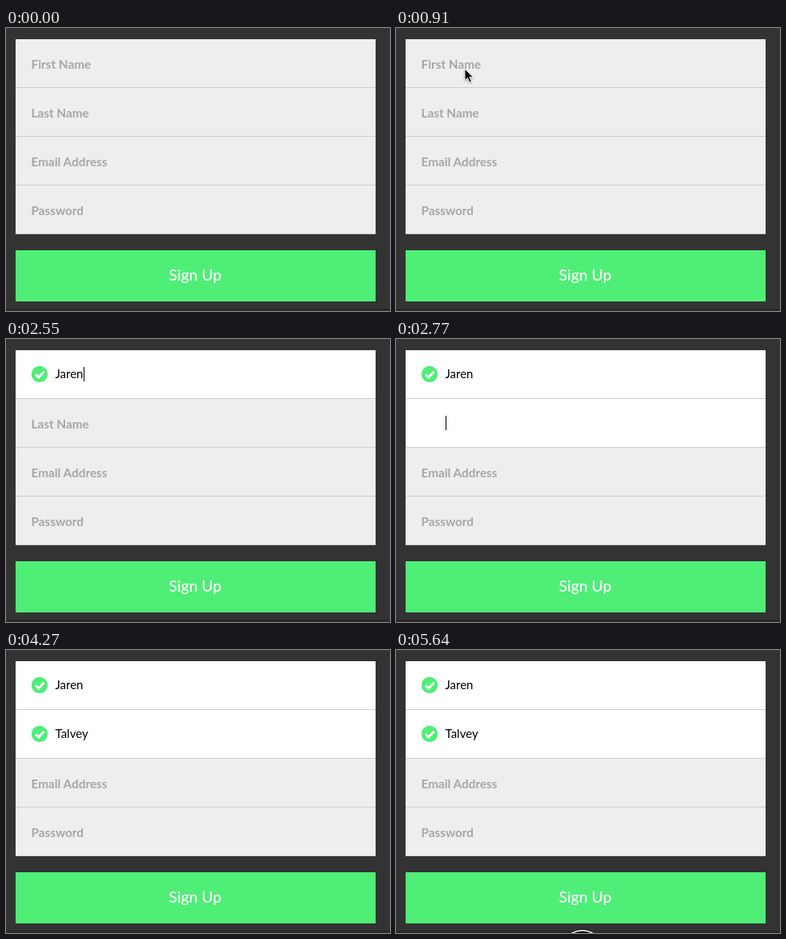
These frames come from a looping animation (480 px wide and 354 px high, 5.69 s). An HTML page:

```html
<!DOCTYPE html>
<html lang="en">
<meta charset="utf-8">
<title>Sign up form</title>
<style>
  html, body { margin: 0; width: 100%; height: 100%; overflow: hidden; background: #333; }
  svg { display: block; width: 480px; height: 354px; font-family: Lato, "Open Sans", sans-serif; }
  .label { font-size: 15.3px; font-weight: 700; fill: #a6a6a6; }
  .value { font-size: 15px; fill: #000; }
  .button { font-size: 19.4px; font-weight: 500; fill: #fff; text-anchor: middle; }
</style>
<svg viewBox="0 0 480 354">
  <g id="fields"></g>
  <rect x="12" y="278" width="450" height="64" fill="#4fee77"/>
  <text class="button" x="236.5" y="316">Sign Up</text>
  <path d="M0 352.500H480" stroke="#2b292a" stroke-width="3"/>
  <g id="ring">
    <circle cx="233" cy="378" r="29" fill="#222"/>
    <circle cx="233" cy="378" r="27" fill="#000" stroke="#fff" stroke-width="1.600"/>
  </g>
  <g id="pointer">
    <path d="M0 0V14.500L3.400 11.400L5.800 17L8.400 15.900L6 10.500H10.500Z"
      fill="#000" stroke="#fff" stroke-width="1" style="filter:drop-shadow(0 1px 1px #0006)"/>
  </g>
</svg>
<script>
const LOOP = 5690;
const $ = id => document.getElementById(id);

// focus and blur times, then the typing interval
const fields = [
  { label: 'First Name', value: 'Jaren', focus: 1230, blur: 2700, from: 1850, to: 2330 },
  { label: 'Last Name', value: 'Talvey', focus: 2700, blur: 3900, from: 3010, to: 3400 },
  { label: 'Email Address' },
  { label: 'Password' }
];

$('fields').innerHTML = fields.map((f, i) => `
  <g transform="translate(12 ${14 + 61 * i})">
    <rect class="back" width="450" height="61"/>
    <path d="M0 60.500H450" stroke="#ccc"/>
    <text class="label" x="19.500" y="37">${f.label}</text>
    <g class="check">
      <circle cx="30" cy="30" r="10.200" fill="#4fee77"/>
      <path d="M25 30.200L28.800 34L35.500 26.700" fill="none" stroke="#fff" stroke-width="3"/>
    </g>
    <text class="value" x="49.500" y="35"></text>
    <rect class="caret" y="21" width="1" height="18"/>
  </g>`).join('');

fields.forEach((f, i) => {
  const row = $('fields').children[i];
  for (const name of ['back', 'label', 'check', 'value', 'caret'])
    f[name + 'El'] = row.querySelector('.' + name);
});

// pointer path: time, x, y
const enter = [[50, 288, 62], [320, 180, 48], [590, 92, 36], [740, 62, 31], [910, 86, 51], [1230, 80, 48], [1850, 80, 48]];
const leave = [[3870, 80, 48], [4000, 55, 29], [4120, 19, 3]];

const show = (el, on) => el.setAttribute('visibility', on ? 'visible' : 'hidden');

function along(path, t) {
  const i = path.findIndex(p => p[0] > t);
  if (i < 1) return null;
  const [t0, x0, y0] = path[i - 1], [t1, x1, y1] = path[i];
  const k = (t - t0) / (t1 - t0), e = k * k * (3 - 2 * k);
  return [x0 + (x1 - x0) * e, y0 + (y1 - y0) * e];
}

function drawField(f, t) {
  const active = t >= f.focus, focused = active && t < f.blur;
  const step = (f.to - f.from) / (f.value ? f.value.length - 1 : 1);
  const count = t >= f.from ? Math.floor((t - f.from) / step) + 1 : 0;
  f.backEl.setAttribute('fill', active ? '#fff' : '#eee');
  show(f.labelEl, !active);
  show(f.checkEl, count > 0);
  f.valueEl.textContent = (f.value || '').slice(0, count);
  f.caretEl.setAttribute('x', Math.round(50 + f.valueEl.getComputedTextLength()));
  show(f.caretEl, focused);
}

function draw() {
  const t = performance.now() % LOOP;
  fields.forEach(f => drawField(f, t));
  const spot = along(enter, t) || along(leave, t);
  show($('pointer'), spot);
  if (spot) $('pointer').setAttribute('transform', `translate(${spot})`);
  $('ring').setAttribute('opacity', Math.min(1, Math.max(0, (t - 5150) / 150)));
  requestAnimationFrame(draw);
}
draw();
</script>
</html>
```
